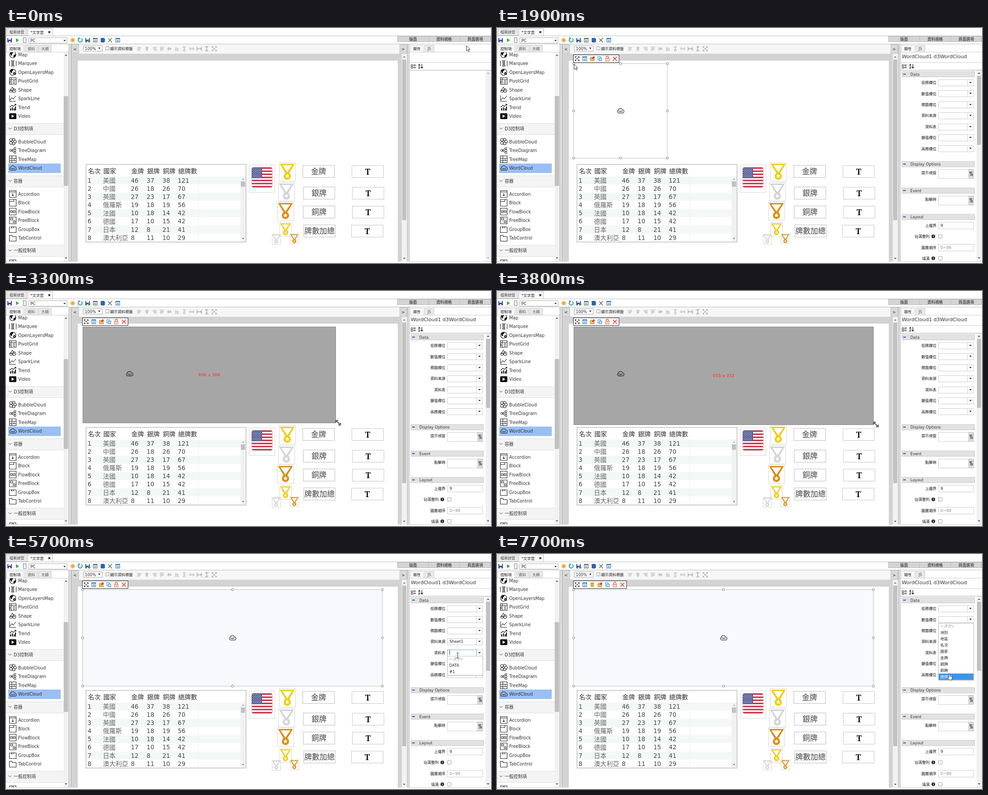
An HTML page that plays this animation: 1076x521 px, repeating every 8000 ms.

```html
<!DOCTYPE html>
<html lang="zh-Hant">
<head>
<meta charset="utf-8">
<title>WordCloud</title>
<style>
html, body { margin: 0; width: 100%; height: 100%; overflow: hidden; background: #fff; }
svg { display: block; width: 1076px; height: 521px; }
text { font-family: 'DejaVu Sans', 'Noto Sans CJK TC', 'Noto Sans CJK', sans-serif; white-space: pre; }
</style>
</head>
<body>
<svg id="stage" viewBox="0 0 1076 521"></svg>
<script>
// Drawing helpers: each returns an SVG fragment.
const box = (x, y, w, h, fill = 'none', stroke, extra = '') => stroke
  ? `<rect x="${x + .5}" y="${y + .5}" width="${w - 1}" height="${h - 1}" fill="${fill}" stroke="${stroke}" ${extra}/>`
  : `<rect x="${x}" y="${y}" width="${w}" height="${h}" fill="${fill}" ${extra}/>`;
const text = (x, y, str, size = 8.5, fill = '#222', extra = '') =>
  `<text x="${x}" y="${y + size * .37}" font-size="${size}" fill="${fill}" ${extra}>${str}</text>`;
const mid = (x, y, str, size, fill, extra = '') => text(x, y, str, size, fill, 'text-anchor="middle" ' + extra);
const line = (d, stroke = '#222', width = 1, extra = '') =>
  `<path d="${d}" fill="none" stroke="${stroke}" stroke-width="${width}" ${extra}/>`;
const shape = (d, fill = '#222', extra = '') => `<path d="${d}" fill="${fill}" ${extra}/>`;
const dot = (x, y, r, fill = 'none', stroke = 'none', width = 1) =>
  `<circle cx="${x}" cy="${y}" r="${r}" fill="${fill}" stroke="${stroke}" stroke-width="${width}"/>`;
const at = (x, y, body, extra = '') => `<g transform="translate(${x} ${y})" ${extra}>${body}</g>`;
const down = (x, y, fill = '#222', s = 2.8) => shape(`M${x - s} ${y - s / 2}h${2 * s}l${-s} ${s}z`, fill);
const up = (x, y, fill = '#555', s = 2.8) => shape(`M${x - s} ${y + s / 2}h${2 * s}l${-s} ${-s}z`, fill);
const each = (list, fn) => list.map(fn).join('');

const cloud = line('M-4 5A3.6 3.6 0 0 1-5.3-1.6A5.6 5.6 0 0 1 4.6-2.5A3.8 3.8 0 0 1 4.5 5Z', '#222', 1.1) +
  mid(0, 1.6, 'TXT', 4.8, '#222', 'font-weight="bold"');
const globe = dot(0, 0, 7, '#fff', '#111', 1.2) + shape('M-6-3Q-3-8 2-6L0-3-2-2-1 1-4 2ZM3 1L6-2 6 3 2 6 1 3Z', '#111');
const frame = line('M-7.5-7.5h15v15h-15z', '#222', 1.1);

const icons = {
  Map: globe,
  Marquee: line('M-7.5-6v12M7.5-6v12M-4-6h2v12h-2M4-6h-2v12h2M0-7v14', '#222', 1.1),
  OpenLayersMap: globe + dot(4, 3, 3.6, '#111', '#fff') + dot(4, 3, 1, '#fff'),
  PivotGrid: frame + line('M-7.5-3.5h15M-3.5-7.5v15M0-1h5M0 2h5M0 5h5M-6-1v6', '#222', 1.1),
  Shape: line('M-1-6l5 8h-10zM1-2h4l2 4-2 4h-4l-2-4z', '#222', 1.1) + dot(-4, 3, 3, 'none', '#222'),
  SparkLine: line('M-7-7v13h14M-6 3l4-5 3 3 6-7', '#222', 1.1),
  Trend: line('M-5 7v-5M-1 7v-7M3 7v-5M6 7v-9', '#111', 2.2) + line('M-7 0l5-5 3 3 6-5M4-7h3v3', '#111', 1.2),
  Video: box(-8, -6.5, 16, 13, '#111', '', 'rx="2"') + shape('M-2.5-3.5v7l6-3.5z', '#fff'),
  BubbleCloud: each([[-4, -4], [2, -4.5], [5, 0], [-4, 3], [2, 4]], p => dot(...p, 3, '#fff', '#222', 1.1)),
  TreeDiagram: line('M-5 0L5-5M-5 0h10M-5 0L5 5', '#222', 1.1) +
    each([[-5, 0], [5, -5], [5, 0], [5, 5]], p => dot(...p, 2.1, '#fff', '#222')),
  TreeMap: frame + line('M-2-7.5v15M-7.5-2h15M-7.5 3h15M3-2v5', '#222', 1.1),
  WordCloud: cloud,
  Accordion: frame + line('M-7.5-4.5h15M0-2v6M-2 2l2 2 2-2', '#222', 1.1),
  Block: frame + line('M-7.5-3h10v-4.5', '#222', 1.1),
  FlowBlock: frame + line('M-5-2h4v4h-4zM1-2h4v4h-4z', '#222', 1.1),
  FreeBlock: frame + line('M-5-5h5v4h-5zM1 1h4v4h-4z', '#222', 1.1),
  GroupBox: line('M-5-5h-2.5v12.5h15V-5H5', '#222', 1.1) + mid(0, -4, 'XY', 6, '#111', 'font-weight="bold"'),
  TabControl: line('M-7.5 7V-6h6v3h9v10z', '#222', 1.1)
};

function item(name, y) {
  return at(15, y, icons[name]) + text(27, y, name, 9.7, '#333');
}

function tab(x, y, w, label, active) {
  return box(x, y, w, 16, active ? '#fff' : '#e9e9e9', '#c8c8c8') + mid(x + w / 2, y + 8, label, 8.3, active ? '#111' : '#555');
}

const disk = (x, y) => box(x - 5, y - 5, 10, 10, '#3a49ad', '', 'rx="1"') + box(x - 3, y - 5, 6, 4, '#fff') + box(x - 2, y + 2, 4, 3, '#dde');
const sheet = (x, y, c) => box(x - 5, y - 5, 10, 10, '#fff', c) + box(x - 5, y - 5, 10, 2.5, c) + line(`M${x - 3} ${y}h6M${x - 3} ${y + 2.5}h6`, c);

function topBars() {
  let s = tab(1, 1, 46, '檔案總管') + box(48, 1, 56, 17, '#fff', '#bbb') + text(54, 9.5, '*文字雲', 8.5) + mid(96, 9.5, '✖', 8);
  s += line('M0 17.5H48M104 17.5H1076M0 35.5H1076', '#bbb');
  s += disk(8, 27) + shape('M22 22.5v9l7-4.5z', '#3fae49') + line('M38.5 21.5h6v11h-6z', '#444', 1.2, 'stroke-dasharray="2 1"');
  s += box(50, 21, 86, 13, '#fff', '#aaa') + text(54, 27.7, 'PC', 8.7) + down(130, 28);
  s += line('M148 21.5v11M142.5 27h11M144 23l8 8M152 23l-8 8', '#e8961c', 1.4) + dot(148, 27, 3, '#f2a42e');
  s += line('M161 24a4.5 4.5 0 1 0 6-1', '#129a9a', 1.8) + shape('M160 21l5 1-4 4z', '#129a9a');
  s += disk(181, 27) + shape('M182 27h5v5h-5z', '#49a24c') + sheet(198, 27, '#566577');
  s += shape('M210 22.5l7-1v11l-7-1zM217 23h2.5v8.5H217z', '#2865b8') + line('M227 23l8 9M235 22l-8 9', '#666', 1.5) + sheet(248, 27, '#2c77b5');
  each([['版面', 868], ['資料規格', 937], ['頁面選項', 1006]], ([label, x]) => {
    s += box(x, 18, 70, 13, '#d4d4d4', '#bbb') + mid(x + 35, 24.5, label, 8.6, '#111', 'font-weight="500"');
  });
  return s;
}

function leftPanel() {
  const groups = [
    [59, ['Map', 'Marquee', 'OpenLayersMap', 'PivotGrid', 'Shape', 'SparkLine', 'Trend', 'Video']],
    [252, ['BubbleCloud', 'TreeDiagram', 'TreeMap', 'WordCloud']],
    [368, ['Accordion', 'Block', 'FlowBlock', 'FreeBlock', 'GroupBox', 'TabControl']]];
  let s = box(0, 36, 145, 482, '#fff') + box(5, 300.5, 116.5, 21, '#99bff4');
  s += each(groups, ([y, names]) => each(names, (n, i) => item(n, y + i * 19.5)));
  s += each([['D3控制項', 211], ['容器', 327], ['一般控制項', 481]], ([label, y]) =>
    box(0, y, 128, 25, '#f4f4f4') + line(`M0 ${y + .5}h128M0 ${y + 25.5}h128`, '#ddd') +
    line(`M5.5 ${y + 10}l3.5 3.5 3.5-3.5`, '#444') + text(17, y + 12.5, label, 9.8, '#333'));
  s += line('M8 518v-4h14v4M12 516h6', '#222', 1.2);
  s += box(0, 36, 139, 18, '#fff') + line('M0 53.5h139', '#ccc');
  s += tab(1, 38, 38, '控制項', true) + tab(41, 38, 30, '資料') + tab(72, 38, 29, '大綱');
  s += box(128, 54, 11, 464, '#f1f1f1') + box(128, 151, 10, 199, '#c1c1c1') + up(133, 60) + down(133, 510, '#555');
  return s + box(139, 36, 6, 482, '#e2e2e2') + line('M139.5 36v482M144.5 36v482', '#aaa');
}

function centerPanel() {
  let s = box(145, 36, 746, 21, '#f6f6f6') + box(145, 57, 746, 461, '#d3d3d3');
  s += box(145, 36, 17, 21, '#d9d9d9', '#c4c4c4') + mid(153, 46.5, '&lt;', 9) + box(873, 36, 17, 21, '#d9d9d9', '#c4c4c4') + mid(881, 46.5, '&gt;', 9);
  s += box(171, 39, 43, 13, '#fff', '#aaa') + text(175, 45.7, '100%', 8.7) + down(207, 45);
  s += box(221, 41, 8, 8, '#fff', '#999') + text(231, 45.7, '顯示資料標籤', 8.4);
  const marks = ['M-4-5v10M-2-3h5v2h-5zM-2 1h3v2h-3z', 'M0-5v10M-3-3h6v2h-6zM-2 1h4v2h-4z', 'M4-5v10M2-3h-5v2h5zM2 1h-3v2h3z',
    'M-5-4h10M-3-2v6h2v-6zM1-2v4h2v-4z', 'M-5 0h10M-3-3v6h2v-6zM1-2v4h2v-4z', 'M-5 4h10M-3 2v-5h2v5zM1 2v-3h2v3z',
    'M-2-5h4v3h-4zM-2 2h4v3h-4zM0-2v4', 'M-5-2h3v4h-3zM2-2h3v4h-3zM-2 0h4', 'M-5-5v10M5-5v10M-4 0h8M-2-2l-2 2 2 2M2-2l2 2-2 2',
    'M-4-5h8M-4 5h8M0-4v8M-2-2l2-2 2 2M-2 2l2 2 2-2', 'M-5-5l10 10M5-5l-10 10M-5-2v-3h3M2 5h3v-3M2-5h3v3M-2 5h-3v-3'];
  s += each(marks, (d, i) => at(296 + i * 16.6, 46, line(d, i > 7 ? '#999' : '#b4b4b4')));
  s += `<rect id="page" x="158.5" y="71.5" width="711.5" height="447" fill="#fff" stroke="#c4c4c4"/>`;
  s += box(878, 57, 12, 461, '#f1f1f1') + box(879, 70, 9, 356, '#c1c1c1') + up(883.5, 64, '#777') + down(883.5, 511, '#555');
  return s + box(890, 36, 5, 482, '#e2e2e2') + line('M890.5 36v482M894.5 36v482', '#aaa');
}

function table() {
  const cols = [182, 216, 278, 313, 348, 382];
  const rows = ['1 美國 46 37 38 121', '2 中國 26 18 26 70', '3 英國 27 23 17 67', '4 俄羅斯 19 18 19 56',
    '5 法國 10 18 14 42', '6 德國 17 10 15 42', '7 日本 12 8 21 41', '8 澳大利亞 8 11 10 29'];
  let s = box(177, 302, 356, 173, '#fff');
  s += each('名次 國家 金牌 銀牌 銅牌 總牌數'.split(' '), (h, c) => text(cols[c], 317, h, 14, '#333'));
  s += each(rows, (row, i) => box(178, 329 + i * 18.1, 342, 18.1, i % 2 ? '#fff' : '#f3f7f8') +
    each(row.split(' '), (v, c) => text(cols[c] - 1, 338 + i * 18.1, v, c === 1 ? 14 : 13.3, c === 1 ? '#666' : '#444', c === 1 ? 'font-weight="300"' : '')));
  s += line('M212.5 329v144M275.5 329v144M310.5 329v144M344.5 329v144M379.5 329v144M427.5 329v144', '#edf0f1');
  s += box(520.5, 329, 11, 144, '#f1f1f1') + box(521, 340, 9.5, 12, '#c1c1c1') + up(526, 335, '#999', 2.3) + down(526, 467, '#555', 2.3);
  return s + box(177, 302, 356, 173, 'none', '#bbb', 'stroke-width="1.5"');
}

function flag() {
  const stripe = 44.5 / 13;
  let s = '<clipPath id="round"><rect x="545.5" y="309" width="45" height="44.5" rx="4"/></clipPath><g clip-path="url(#round)">';
  for (let i = 0; i < 13; i++) s += box(545, 309 + i * stripe, 46, stripe + .1, i % 2 ? '#fff' : '#c7354a');
  s += box(545, 309, 23, stripe * 7, '#46518c');
  for (let r = 0; r < 9; r++) for (let c = 0; c < 6 - r % 2; c++) s += dot(547.8 + c * 3.6 + r % 2 * 1.8, 311 + r * 2.45, .8, '#fff');
  return s + '</g>' + box(539, 303, 58, 62, 'none', '#aaa', 'stroke-dasharray="1 1"') + box(544, 307.5, 48, 47.5, 'none', '#ccc', 'rx="5"');
}

function medal(x, y, k, color) {
  const star = each([...Array(10).keys()], i => {
    const a = Math.PI * (i / 5 - .5), r = i % 2 ? 2.3 : 5.4;
    return `${i ? 'L' : 'M'}${(18 + r * Math.cos(a)).toFixed(1)} ${(30.5 + r * Math.sin(a)).toFixed(1)}`;
  });
  return at(x, y, `<g transform="scale(${k})">` + shape('M1.500 3H34.500L22.500 23H13.500ZM7 6L18 22 29 6Z', color, 'fill-rule="evenodd"') +
    dot(18, 30.5, 8, color) + shape(star + 'Z', '#fff') + '</g>' +
    box(0, 0, Math.round(37 * k), Math.round(42 * k), 'none', '#aaa', 'stroke-dasharray="1 1"'));
}

function pageItems() {
  const gold = '#f0cb08', silver = '#d3d3d3', bronze = '#d98c0b';
  let s = table() + flag() + medal(606, 298, 1, gold) + medal(604, 342, 1, silver) + medal(602, 385, 1, bronze) +
    medal(607, 431, .73, gold) + medal(590, 457, .54, silver) + medal(630, 456, .54, bronze);
  const labels = [['金牌', 658, 304, 767], ['銀牌', 659, 352, 768], ['銅牌', 659, 394, 768], ['牌數加總', 660, 436, 766]];
  return s + each(labels, ([label, x, y, tx]) => box(x, y, 71, 28, 'none', '#bbb') +
    mid(x + 35.5, y + 13.5, label, 16.8, '#444', 'font-weight="300"') + box(tx, y + .5, 71, 27.5, '#fff', '#c4c4c4') +
    mid(tx + 35.5, y + 14.5, 'T', 17.5, '#111', `style="font-family:'Noto Serif',serif;font-weight:600"`));
}

function rightFrame() {
  return box(895, 36, 181, 482, '#fff') + tab(897, 38, 29, '屬性', true) + tab(928, 38, 22, 'JS') +
    line('M895 53.5h2M926 53.5h150M895 76.5h181', '#ccc') +
    line('M898.5 81.5h4v3h-4zM898.5 86.5h4v3h-4zM904 81.5h5M904 83.5h5M904 86.5h5M904 88.5h5', '#333') +
    text(914.5, 82, 'A', 6, '#111', 'font-weight="bold"') + text(914.5, 88, 'Z', 6, '#111', 'font-weight="bold"') +
    line('M922.5 80v9M920 86.5l2.5 2.5 2.5-2.5', '#222', 1.3) + line('M895 93.5h181', '#aaa') +
    box(1064, 94, 12, 424, '#f1f1f1') + up(1069.5, 100, '#aaa') + down(1069.5, 510, '#aaa');
}

const label = (y, str) => text(975, y, str, 8.4, '#111', 'text-anchor="end"');
const combo = y => box(979, y - 7, 79, 15, '#fff', '#ccc') + line(`M1043.5 ${y - 7}v15`, '#ccc') + down(1050.5, y);

function properties() {
  const fields = ['低標欄位', '數值欄位', '標題欄位', '資料來源', '資料表', '鍵值欄位', '高標欄位'];
  let s = text(898, 63, 'WordCloud1 d3WordCloud', 11.05, '#333');
  s += each([['Data', 96], ['Display Options', 295.5], ['Event', 354], ['Layout', 412.5]], ([name, y]) =>
    box(898, y, 162, 13, '#e2e2e2', '#c8c8c8') + box(901, y + 5, 6, 2.5, '#3f73c5') + text(917, y + 6.5, name, 8.6, '#333'));
  s += each(fields, (f, i) => label(121 + i * 24.4, f) + combo(Math.round(121 + i * 24.4)));
  s += each([['提示視窗', 321], ['點擊時', 380]], ([f, y]) => label(y, f) + box(979, y - 8, 68, 21, '#fff', '#ccc') +
    box(1046, y - 8, 12, 21, '#ddd', '#bbb') + line(`M1055 ${y - 2}h-6l1 4h4l1 4h-6M1050 ${y}h4M1050 ${y + 4}h4`, '#345', 1.2));
  s += label(438, '上邊界') + box(979, 430, 79, 16, '#fff', '#ccc') + text(984, 438, '9', 8.7);
  s += label(487, '圖層順序') + box(979, 479, 79, 16, '#fff', '#ccc') + text(984, 487, '0~99', 8.7, '#888');
  s += each([['佔滿整列', 462], ['填滿', 510.5]], ([f, y]) => text(960, y, f, 8.4, '#111', 'text-anchor="end"') +
    dot(968, y, 4, '#222') + mid(968, y, 'i', 6.5, '#fff', 'font-weight="bold"') + box(979, y - 4.5, 9, 9, '#fff', '#999', 'rx="1"'));
  return s + box(1065, 106, 9, 153, '#c1c1c1') + up(1069.5, 100) + down(1069.5, 510, '#555');
}

const cursors = {
  arrow: shape('M0 0V11.8L2.7 9.2 4.6 13.4 6.5 12.5 4.7 8.5H8.2Z', '#fff', 'stroke="#222" stroke-width=".9"'),
  beam: line('M-2.5-5.5h2l.5.5.5-.5h2M0-5v10M-2.5 5.5h2l.5-.5.5.5h2', '#222'),
  resize: line('M-4-4L4 4', '#222', 1.6) + line('M-5.5-1v-4.5h4.5zM5.5 1v4.5h-4.5z', '#222', 1.1, 'style="fill:#fff"'),
  hand: shape('M-1.3 0Q0-1.6 1.1 0V5L5 5.6Q6 6 6 7.5L5 13H-1L-4.5 8Q-4-6.5-4 6.5L-1.3 8Z'.replace('-4-6.5', '-4.5 6.5'), '#fff', 'stroke="#222" stroke-width=".9"')
};
// time, x, y, pointer kind
const path = [
  [0, 1021.5, 39, 'arrow'], [800, 75, 317, 'arrow'], [900, 93, 288, 'arrow'], [1000, 189.5, 179, 'arrow'], [1700, 171, 80, 'arrow'],
  [1900, 171, 80, 'arrow'], [2000, 189, 110, 'arrow'], [2100, 246, 135, 'arrow'], [2300, 342, 260, 'arrow'], [2500, 389, 291, 'arrow'],
  [2600, 389, 291, 'arrow'], [2700, 380, 289, 'arrow'], [2800, 379, 290, 'resize'], [2900, 378, 289, 'resize'], [3000, 378, 289, 'resize'],
  [3100, 470, 290, 'resize'], [3300, 737, 292, 'resize'], [3400, 795, 295, 'resize'], [3600, 842, 300, 'resize'], [3900, 840, 294, 'resize'],
  [4000, 850, 290, 'arrow'], [4200, 953, 262, 'arrow'], [4500, 1003, 195, 'beam'], [4700, 1003, 196, 'beam'], [4900, 1003, 219, 'hand'],
  [5300, 1003, 219, 'beam'], [5400, 1002, 225, 'beam'], [5700, 1002, 225, 'beam'], [5900, 1002, 243, 'hand'], [6100, 1002, 243, 'hand'],
  [6200, 1002, 242, 'beam'], [7000, 1003, 151, 'beam'], [7100, 1003, 151, 'beam'], [7200, 1003, 162, 'hand'], [7700, 1004, 266, 'hand']];

function pointer(t) {
  const i = path.findLastIndex(k => k[0] <= t), a = path[i], b = path[i + 1] || a;
  let u = b === a ? 0 : (t - a[0]) / (b[0] - a[0]);
  if (b[0] - a[0] > 400) u = u * u * (3 - 2 * u);
  return { x: a[1] + (b[1] - a[1]) * u, y: a[2] + (b[2] - a[2]) * u, kind: a[3] };
}

function widget(t, p) {
  const sized = t >= 4000, resizing = t >= 3100 && !sized;
  const w = sized ? 665 : 208, h = sized ? (t < 5300 ? 215.5 : 214) : 209.5;
  let s = '';
  if (resizing) {
    const gw = p.x - 175, gh = p.y - 78.5;
    s += at(274, 183.5, cloud) + box(170, 79, gw, gh + .5, 'rgba(0,0,0,.35)', '#888') +
      mid(170 + gw / 2, 79 + gh / 2, `${Math.round(gw / .6973)} x ${Math.round(gh / .6973)}`, 8.9, '#ee5252', 'font-weight="bold"');
  } else {
    s += box(169.5, 78.5, w + 1, h + 1, sized ? '#f7f9fc' : '#fff', '#bbb') + at(170 + w / 2, 79 + h / 2, cloud);
    for (const fx of [0, .5, 1]) for (const fy of [0, .5, 1])
      if (fx !== .5 || fy !== .5) s += dot(170 + fx * w, 79 + fy * h, 2.4, '#fff', '#777');
  }
  const tools = [
    line('M-4.500-1.500v-3h3M1.500-4.500h3v3M4.500 1.500v3h-3M-1.500 4.500h-3v-3M-4-4l2.500 2.500M4-4l-2.500 2.500M4 4l-2.500-2.500M-4 4l2.500-2.500', '#222') + box(-1, -1, 2, 2, '#222'),
    sheet(0, 0, '#2c77b5'),
    box(-5, -3, 10, 8, '#f1bd5e', '#b98428') + shape('M-1-1l4-5 3 3-4 4z', '#d6453a'),
    box(-5, -5, 7, 8, '#fff', '#2c86c9') + box(-2, -2, 7, 7, '#cfe6f8', '#2c86c9'),
    line('M-2.5-1v-2a2.5 2.5 0 0 1 5 0v2', '#e2552d', 1.3) + box(-4.5, -1, 9, 6.5, '#fff', '#e2552d') + dot(0, 2, 1, '#e2552d'),
    line('M-4.5-4.5l9 9M4.5-4.5l-9 9', '#e23b2e', 1.7)];
  if (t >= 6200) tools.splice(2, 0, shape('M-4-4Q0-7 4-4V4Q0 7-4 4Z', '#e5b043') + line('M-4-4Q0-1.500 4-4', '#b98428'));
  return s + box(169, 59, 2 + tools.length * 16.7, 18, '#fff', '#222') + each(tools, (icon, i) => at(178 + i * 16.7, 68, icon));
}

function dropdown(top, items, p) {
  const rows = ['&lt;清空&gt;', ...items], hover = Math.floor((p.y + 4 - top) / 14);
  return box(979, top, 79, rows.length * 14 + 1, '#fff', '#c4c4c4', 'style="filter:drop-shadow(0 1px 1px #0003)"') +
    each(rows, (row, i) => {
      const on = p.kind === 'hand' && i === hover && i > 0;
      return (on ? box(980, top + i * 14, 77, 14, '#3f93ea') : '') +
        text(983.5, top + 7 + i * 14, row, 8.5, on ? '#fff' : i ? '#222' : '#aaa', i ? '' : 'font-style="italic"');
    });
}

function live(t) {
  const p = pointer(t);
  let s = '';
  if (t >= 900 && t < 1900)
    s += at(p.x - .5, p.y + 22, box(0, 0, 143, 21, '#99bff4') + at(10, 10.5, cloud) + text(22, 10.5, 'WordCloud', 9.7, '#333'), 'opacity=".7"');
  if (t >= 1900) s += properties() + widget(t, p);
  if (t >= 5300) s += text(984, 194, 'Sheet1', 8.7);
  if (t >= 6200) s += text(984, 218.5, 'DATA', 8.7);
  const focus = t >= 4700 && t < 5700 ? 187 : t >= 5700 && t < 7100 ? 212 : 0;
  if (focus) s += box(979, focus, 65, 15, 'none', '#79a7df');
  if (t >= 4700 && t < 5300) s += line('M984.5 189v10', '#222') + dropdown(202, ['Sheet1', '#1'], p);
  if (t >= 5700 && t < 6200) s += line('M984.5 213.5v10', '#222') + dropdown(226, ['DATA', '#1'], p);
  if (t >= 7100) s += dropdown(153, ['洲別', '地區', '名次', '國家', '金牌', '銀牌', '銅牌', '總牌數'], p);
  return s + at(p.x, p.y, cursors[p.kind]);
}

const stage = document.getElementById('stage');
stage.innerHTML = topBars() + centerPanel() + pageItems() + leftPanel() + rightFrame() +
  box(0, 518, 1076, 3, '#fff') + line('M0 517.5h145M895 517.5h181', '#ccc') + '<g id="live"></g>';
const page = document.getElementById('page'), layer = document.getElementById('live');
const start = performance.now();
let shown = -1;

function draw(now) {
  const t = Math.floor(Math.max(0, now - start) % 8000 / 100) * 100;
  if (t !== shown) {
    shown = t;
    const dragging = t >= 1000 && t < 1900;
    page.setAttribute('fill', dragging ? '#f8cbcb' : '#fff');
    page.setAttribute('stroke', dragging ? '#dba9a9' : '#c4c4c4');
    layer.innerHTML = live(t);
  }
  requestAnimationFrame(draw);
}
draw(start);
</script>
</body>
</html>
```
